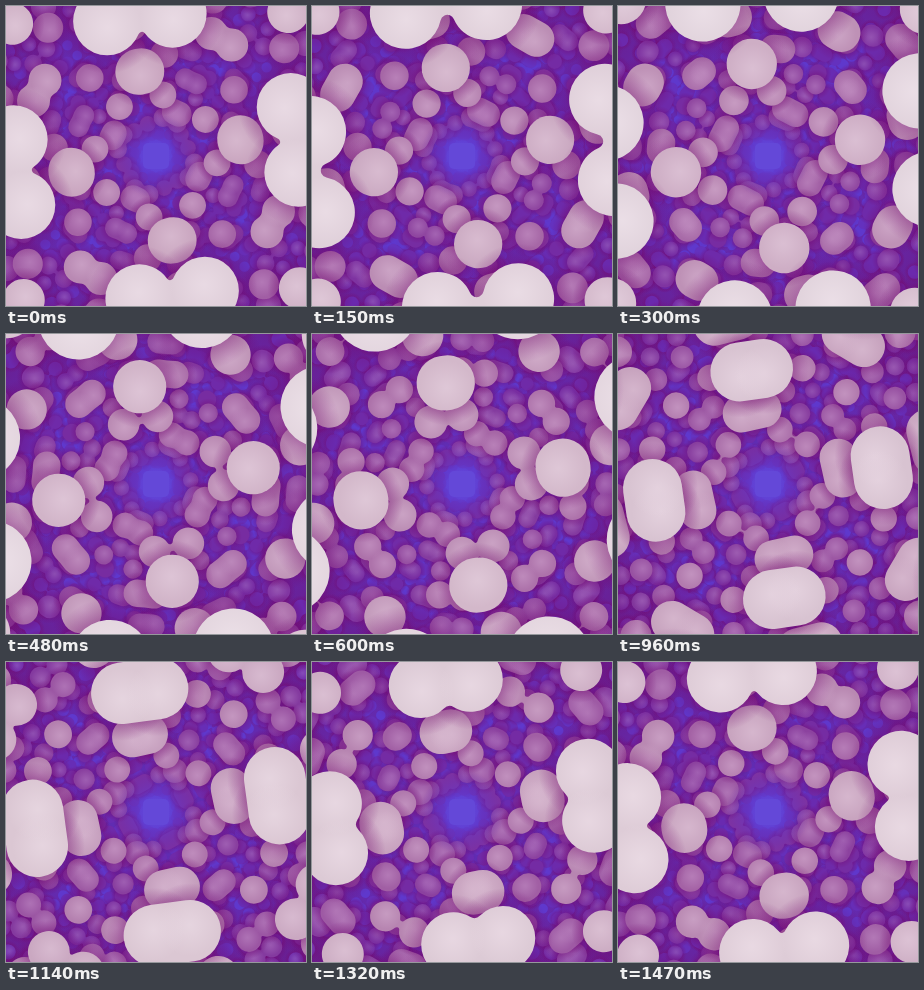
Write an HTML page with a canvas that moves like this. It is 300 by 300 pixels and loops after 1500 ms.

```html
<!DOCTYPE html>
<html>
<head>
<meta charset="utf-8">
<style>
html, body { margin: 0; width: 100%; height: 100%; overflow: hidden; background: #651c8c; }
canvas { display: block; width: 300px; height: 300px; }
</style>
</head>
<body>
<canvas id="c" width="300" height="300"></canvas>
<script>
const LOOP = 1500, RAD = Math.PI / 180, FAR = 12;
const ctx = document.getElementById('c').getContext('2d');

// Concentric rings of balls: depth offset, depth of one merge, angle there
const rings = [
  { k: 1, off: 0.5, merge: 2.3, angle: -10 },
  { k: 2, off: 0.2, merge: 2.86, angle: 30 },
  { k: 3, off: 0.85, merge: 3.8, angle: 50 },
  { k: 4, off: 0.6, merge: 4.6, angle: 8 },
  { k: 5, off: 0.35, merge: 5.4, angle: 20 },
  { k: 6, off: 0.1, merge: 6.1, angle: 5 }
];

// Depth, red, green, blue
const fog = [
  [1.2, 235, 221, 230], [1.8, 227, 206, 219], [2.5, 209, 172, 199],
  [3.2, 193, 143, 186], [4.2, 171, 103, 172], [5.2, 146, 69, 166],
  [7, 122, 45, 164], [9, 108, 42, 177], [12, 97, 57, 208]
];

const clamp = (v, a, b) => Math.max(a, Math.min(b, v));

function fogColor(z) {
  const d = clamp(z, fog[0][0], FAR);
  const i = Math.max(1, fog.findIndex(s => s[0] >= d));
  const a = fog[i - 1], b = fog[i], f = (d - a[0]) / (b[0] - a[0]);
  return [1, 2, 3].map(n => a[n] + (b[n] - a[n]) * f);
}

const rgba = (c, a = 1, m = 1) => `rgba(${c.map(v => Math.round(v * m)).join()},${a})`;

function radial(x, y, r0, r1, ...stops) {
  const g = ctx.createRadialGradient(x, y, r0, x, y, r1);
  stops.forEach(([p, c]) => g.addColorStop(p, c));
  return g;
}

function disc(x, y, r) {
  ctx.beginPath();
  ctx.arc(x, y, r, 0, 7);
  ctx.fill();
}

// Two balls at x = -d and x = d, joined by a neck that thins as they part
function pairPath(d, r) {
  const q = d / r;
  ctx.beginPath();
  if (q >= 1.25) {
    for (const x of [-d, d]) {
      ctx.moveTo(x + r, 0);
      ctx.arc(x, 0, r, 0, 7);
    }
    return;
  }
  const n = Math.min(1, (1.25 - q) / 0.65);
  if (n > 0.985) {
    ctx.arc(d, 0, r, -Math.PI / 2, Math.PI / 2);
    ctx.arc(-d, 0, r, Math.PI / 2, Math.PI * 1.5);
  } else {
    const p = (q * q + n * n - 1) / (2 * (1 - n));
    const a = Math.atan2(n + p, q), h = (n + p) * r;
    ctx.arc(d, 0, r, a - Math.PI, Math.PI - a);
    ctx.arc(0, h, p * r, -a, a - Math.PI, true);
    ctx.arc(-d, 0, r, a, -a);
    ctx.arc(0, -h, p * r, Math.PI - a, a, true);
  }
  ctx.closePath();
}

function drawPair(b, angle) {
  const { z, k, spread } = b;
  const R = 215 * k / z;
  const d = R * Math.sin(spread * RAD), y = -R * Math.cos(spread * RAD);
  const r = (46 + 12 * clamp(1 - d * z / 85, 0, 1)) / z;
  if (R - r - d > 215) return;
  const depth = z + 0.5 * Math.max(0, k - 2);
  const color = fogColor(depth);
  ctx.save();
  ctx.rotate(angle * RAD);
  ctx.translate(0, y);
  if (z < 8) {
    for (const x of d < r * 0.3 ? [0] : [-d, d]) {
      const s = r * 1.55;
      ctx.fillStyle = radial(x, 0, r * 0.9, s, [0, 'rgba(116,10,112,.42)'], [1, 'rgba(116,10,112,0)']);
      disc(x, 0, s);
    }
  }
  pairPath(d, r);
  ctx.fillStyle = rgba(color, 1, depth < 6 ? 0.96 : 0.98);
  ctx.fill();
  if (z < 6.5) {
    ctx.clip();
    const lit = color.map(v => v + (255 - v) * 0.2);
    for (const x of d < r * 0.2 ? [0] : [-d, d]) {
      ctx.fillStyle = radial(x, r * 0.18, 0, r,
        [0, rgba(lit, 0.75)], [0.3, rgba(lit, 0.55)], [1, rgba(lit, 0)]);
      disc(x, r * 0.18, r);
    }
  }
  ctx.restore();
}

function ballsAt(t) {
  const list = [];
  for (const g of rings) {
    const period = 2.35 / g.k + 0.15, step = 90 / g.k;
    for (let n = 1; n <= FAR; n++) {
      const z = g.off + n - t;
      if (z < 0.75) continue;
      const i = Math.round((z - g.merge) / period);
      const u = Math.abs(z - g.merge - i * period), rest = period * 0.06;
      const spread = step / 4 * clamp((u - rest) / (period / 2 - rest), 0, 1);
      const mid = g.angle - 4.2 / g.k * (z - g.merge) + i * step / 2;
      list.push({ z, k: g.k, spread, mid, step });
    }
  }
  return list.sort((a, b) => b.z - a.z);
}

function draw(t) {
  ctx.setTransform(1, 0, 0, 1, 150, 150);
  ctx.fillStyle = radial(0, 0, 0, 215,
    [0, '#6248dc'], [0.08, '#6040d0'], [0.2, '#602cb2'], [0.6, '#642aae'], [1, '#6a1c8c']);
  ctx.fillRect(-150, -150, 300, 300);
  for (const b of ballsAt(t))
    for (let j = 0; j < 4 * b.k; j++) drawPair(b, b.mid + j * b.step);
  // Blue haze at the end of the tunnel
  ctx.fillStyle = radial(0, 0, 8, 42, [0, 'rgba(98,72,220,.9)'], [0.35, 'rgba(98,60,208,.5)'], [1, 'rgba(98,50,190,0)']);
  disc(0, 0, 42);
  ctx.fillStyle = '#6448d8';
  ctx.beginPath();
  ctx.roundRect(-13, -13, 26, 26, 5);
  ctx.fill();
}

function frame() {
  // The picture advances in 30 ms steps
  draw(Math.floor(performance.now() % LOOP / 30) * 30 / LOOP);
  requestAnimationFrame(frame);
}
frame();
</script>
</body>
</html>
```
